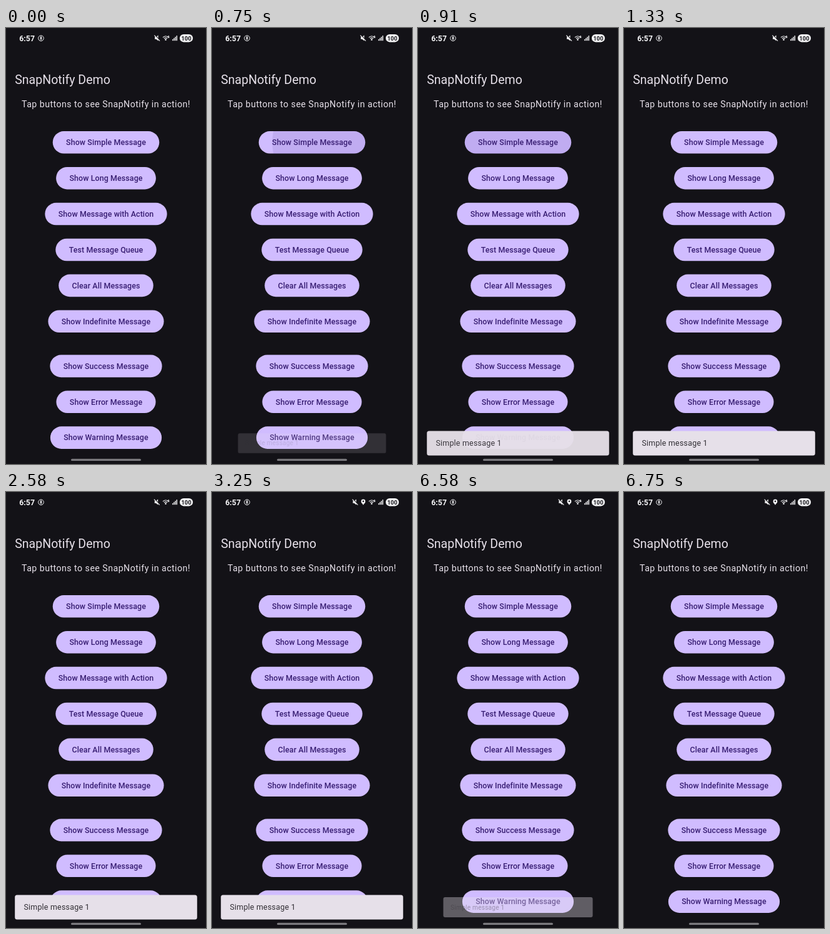
An HTML page with a canvas that plays this animation: 320 by 693 pixels, repeating every 8000 ms.

```html
<!DOCTYPE html>
<html lang="en">
<head>
<meta charset="utf-8">
<title>Snackbar demo</title>
<style>
  html, body { margin: 0; width: 100%; height: 100%; overflow: hidden; background: #131217; }
  canvas { display: block; width: 320px; height: 693px; }
</style>
</head>
<body>
<canvas id="stage"></canvas>
<script>
const W = 320, H = 693, LOOP = 8000, FPS = 12;
const DP = W / 360;      // layout is 360dp wide
const SLOW = 1.37;       // recorded playback speed of the UI animations
const BG = '#131217', LIGHT = '#e6e0e9', WHITE = '#f4f4f6';
const LILAC = '#d0bcff', PURPLE = '#381e72';

const canvas = document.getElementById('stage');
const ctx = canvas.getContext('2d');
const ratio = window.devicePixelRatio || 1;
canvas.width = W * ratio;
canvas.height = H * ratio;

const labels = [
  'Show Simple Message', 'Show Long Message', 'Show Message with Action',
  'Test Message Queue', 'Clear All Messages', 'Show Indefinite Message',
  'Show Success Message', 'Show Error Message', 'Show Warning Message'
];

const clamp = v => Math.min(1, Math.max(0, v));
const mix = (a, b, k) => a + (b - a) * k;
const progress = (t, start, length) => clamp((t - start) / length);

// cubic-bezier(0.4, 0, 0.2, 1)
function ease(x) {
  let lo = 0, hi = 1;
  for (let i = 0; i < 20; i++) {
    const m = (lo + hi) / 2, n = 1 - m;
    if (1.2 * n * n * m + 0.6 * n * m * m + m * m * m < x) lo = m;
    else hi = m;
  }
  return lo * lo * (3 - 2 * lo);
}

function pill(x, y, w, h, r, color) {
  ctx.beginPath();
  ctx.roundRect(x, y, w, h, r);
  ctx.fillStyle = color;
  ctx.fill();
}

function disc(x, y, r, color) {
  ctx.beginPath();
  ctx.arc(x, y, r, 0, Math.PI * 2);
  ctx.fillStyle = color;
  ctx.fill();
}

function poly(points, color) {
  ctx.beginPath();
  points.forEach(([x, y]) => ctx.lineTo(x, y));
  ctx.closePath();
  ctx.fillStyle = color;
  ctx.fill();
}

function line(x1, y1, x2, y2, width, color) {
  ctx.beginPath();
  ctx.moveTo(x1, y1);
  ctx.lineTo(x2, y2);
  ctx.lineWidth = width;
  ctx.strokeStyle = color;
  ctx.stroke();
}

function setFont(size, weight = 400, spacing = 0) {
  ctx.font = `${weight} ${size}px Roboto, sans-serif`;
  ctx.letterSpacing = spacing + 'px';
}

function text(str, x, y, color, align = 'left') {
  ctx.textAlign = align;
  ctx.fillStyle = color;
  ctx.fillText(str, x, y);
}

function muteIcon(x) {
  ctx.save();
  ctx.translate(x, 16);
  poly([[-3.6, -1.7], [-1.4, -1.7], [1.8, -4.4], [1.8, 4.4], [-1.4, 1.7], [-3.6, 1.7]], WHITE);
  line(-3.6, -5, 5, 4.2, 1.2, BG);
  line(-4.4, -4.4, 4.4, 4.6, 1.2, WHITE);
  ctx.restore();
}

function pinIcon(x, k) {
  if (k <= 0) return;
  ctx.save();
  ctx.globalAlpha = k;
  ctx.translate(x, 16);
  ctx.scale(k, k);
  disc(0, -1.1, 3.4, WHITE);
  poly([[-3.1, 0.2], [3.1, 0.2], [0, 4.8]], WHITE);
  disc(0, -1.2, 1.2, BG);
  ctx.restore();
}

function wifiIcon() {
  ctx.strokeStyle = WHITE;
  ctx.lineWidth = 1.2;
  for (const r of [3.4, 6]) {
    ctx.beginPath();
    ctx.arc(255.5, 19, r, -Math.PI * 0.77, -Math.PI * 0.23);
    ctx.stroke();
  }
  disc(255.5, 18.6, 1.3, WHITE);
  setFont(5.5, 700);
  text('6', 258.6, 15.6, WHITE);
}

function statusBar(t) {
  setFont(12.3, 700);
  text('6:57', 21.3, 20.6, WHITE);

  ctx.beginPath();
  ctx.arc(56, 16.3, 4.3, 0, Math.PI * 2);
  ctx.lineWidth = 1;
  ctx.strokeStyle = WHITE;
  ctx.stroke();
  disc(56, 14.2, 1, WHITE);
  line(54, 16, 58, 16, 0.9, WHITE);
  line(56, 15, 56, 17.4, 1.4, WHITE);
  line(56, 17, 54.7, 19.2, 0.9, WHITE);
  line(56, 17, 57.3, 19.2, 0.9, WHITE);

  const k = ease(progress(t, 2540, 420));
  muteIcon(mix(241.7, 229, k));
  pinIcon(242, k);
  wifiIcon();
  for (let i = 0; i < 4; i++) {
    const h = 2.4 + i * 1.9;
    ctx.fillStyle = WHITE;
    ctx.fillRect(266 + i * 2.2, 20.2 - h, 1.4, h);
  }
  pill(278, 10, 21, 12.4, 6.2, WHITE);
  setFont(9.2, 700);
  text('100', 288.5, 19.5, '#17161b', 'center');
}

function ripple(t, y) {
  const p = progress(t, 611, 225 * SLOW);
  const alpha = progress(t, 611, 75 * SLOW) * (1 - progress(t, 919, 150 * SLOW));
  if (alpha <= 0) return;
  ctx.save();
  ctx.clip();
  ctx.globalAlpha = alpha * 0.1;
  disc(mix(198, 160, p), y, mix(52, 98, ease(p)), PURPLE);
  ctx.restore();
}

function buttons(t) {
  const h = 40 * DP;
  labels.forEach((label, i) => {
    const y = 181.8 + (i * 64 + (i > 5 ? 16 : 0)) * DP;
    setFont(14 * DP, 500, 0.1 * DP);
    const w = ctx.measureText(label).width + 48 * DP;
    pill(160 - w / 2, y - h / 2, w, h, h / 2, LILAC);
    if (i === 0) ripple(t, y);
    text(label, 160, y + 4.3, PURPLE, 'center');
  });
}

function snackbar(t) {
  const length = 150 * SLOW;
  const enter = progress(t, 720, length), leave = progress(t, 6453, length);
  const alpha = enter * (1 - leave);
  if (alpha <= 0) return;
  const scale = 0.8 + 0.2 * (ease(enter) - ease(leave));
  ctx.save();
  ctx.globalAlpha = alpha;
  ctx.translate(160, 660);
  ctx.scale(scale, scale);
  pill(-145.8, -19.5, 291.6, 39, 4 * DP, LIGHT);
  setFont(14 * DP, 400, 0.25 * DP);
  text('Simple message 1', -131.6, 4.3, '#322f35');
  ctx.restore();
}

function draw(t) {
  ctx.setTransform(ratio, 0, 0, ratio, 0, 0);
  ctx.fillStyle = BG;
  ctx.fillRect(0, 0, W, H);
  statusBar(t);
  setFont(22 * DP);
  text('SnapNotify Demo', 14.2, 89, LIGHT);
  setFont(16 * DP, 400, 0.5 * DP);
  text('Tap buttons to see SnapNotify in action!', 160, 126, LIGHT, 'center');
  buttons(t);
  snackbar(t);
  pill(104, 684.7, 112, 3.4, 1.7, '#7b7a7e');
}

const start = performance.now();
function tick() {
  const t = (performance.now() - start) % LOOP;
  draw(Math.floor((t + 7) * FPS / 1000) * 1000 / FPS);
  requestAnimationFrame(tick);
}
tick();
</script>
</body>
</html>
```
